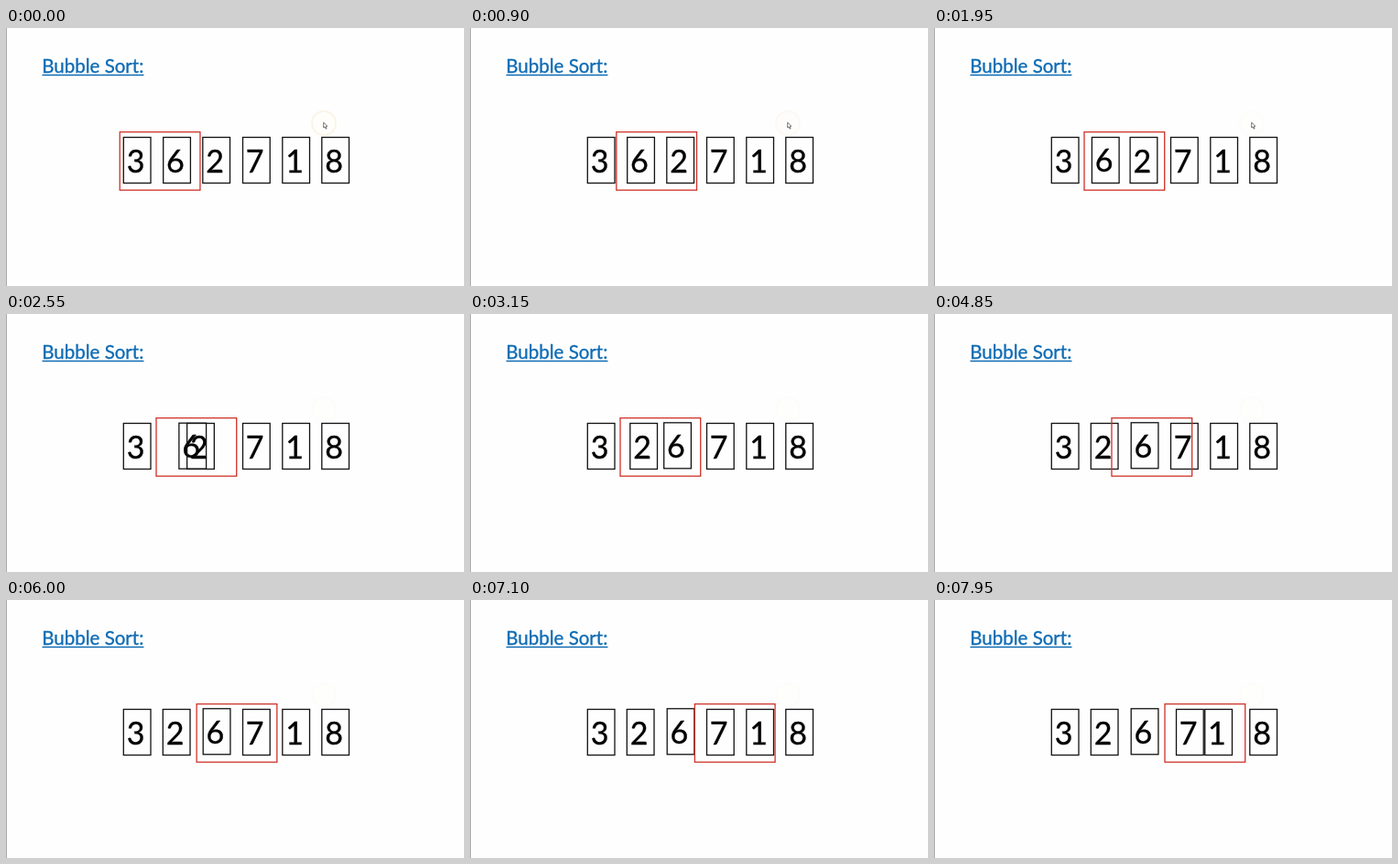
An HTML page with a canvas that plays this animation: 500 px wide and 282 px high, repeating every 8000 ms.

```html
<!DOCTYPE html>
<html lang="en">
<head>
<meta charset="utf-8">
<title>Bubble Sort</title>
<style>
  html, body { margin: 0; width: 100%; height: 100%; overflow: hidden; background: #fff; }
  canvas { display: block; width: 100%; height: 100%; }
</style>
</head>
<body>
<canvas id="stage" width="500" height="282"></canvas>
<script>
const LOOP = 8000;
const MOVE = 1600;
const FONT = 'Lato, Carlito, sans-serif';
const ctx = document.getElementById('stage').getContext('2d');

// Constant acceleration to the midpoint, then constant deceleration
function ease(time, start, duration = MOVE) {
  const p = Math.min(1, Math.max(0, (time - start) / duration));
  return p < 0.5 ? 2 * p * p : 1 - 2 * (1 - p) ** 2;
}

// A thin outline gives the letters a slightly heavier weight
function drawText(text, x, y, size, color) {
  ctx.font = `${size}px ${FONT}`;
  ctx.fillStyle = ctx.strokeStyle = color;
  ctx.lineWidth = 0.35;
  ctx.fillText(text, x, y);
  ctx.strokeText(text, x, y);
}

function drawTitle() {
  const text = 'Bubble Sort:';
  drawText(text, 39.3, 48.6, 20.5, '#0f6cb4');
  ctx.fillRect(39.5, 50.7, ctx.measureText(text).width, 1.5);
}

function drawCard(digit, x, y = 119.5) {
  ctx.strokeStyle = '#111';
  ctx.lineWidth = 1.3;
  ctx.strokeRect(x, y, 29.7, 50);
  ctx.textAlign = 'center';
  drawText(digit, x + 13.2, y + 38, 34, '#000');
  ctx.textAlign = 'left';
}

function drawSelection(x) {
  ctx.strokeStyle = '#cf3229';
  ctx.lineWidth = 1.3;
  ctx.strokeRect(x, 113.7, 87.7, 63.5);
}

function drawPointer(time) {
  const glow = Math.max(0.12, 0.6 - time / 2800);
  ctx.strokeStyle = `rgba(248, 236, 220, ${glow})`;
  ctx.fillStyle = `rgba(255, 253, 248, ${glow})`;
  ctx.lineWidth = 2;
  ctx.beginPath();
  ctx.arc(347, 104, 13, 0, 2 * Math.PI);
  ctx.fill();
  ctx.stroke();
  if (time >= 2300) return;

  ctx.fillStyle = '#fff';
  ctx.strokeStyle = '#666';
  ctx.lineWidth = 0.9;
  ctx.beginPath();
  [[346.7, 103.2], [346.7, 109], [348, 107.9], [349, 110.2],
   [350.1, 109.7], [349.2, 107.5], [350.9, 107.3]].forEach(([x, y]) => ctx.lineTo(x, y));
  ctx.closePath();
  ctx.fill();
  ctx.stroke();
}

function draw(time) {
  ctx.fillStyle = '#fefefe';
  ctx.fillRect(0, 0, 500, 282);
  ctx.fillStyle = '#aaa';
  ctx.fillRect(0, 0, 1, 282);

  drawTitle();
  drawPointer(time);

  const firstSwap = 43.5 * ease(time, 1800, 1690);
  const secondSwap = 43.5 * ease(time, 7530);
  drawCard('3', 128.3);
  drawCard('6', 171.7 + firstSwap, 119.5 - firstSwap / 60);
  drawCard('2', 214.8 - firstSwap);
  drawCard('7', 258.5 + secondSwap);
  drawCard('1', 301.8 - secondSwap);
  drawCard('8', 344.8);

  const steps = ease(time, -350) + ease(time, 3890) + ease(time, 5940);
  drawSelection(120 + 44 * steps);
}

function frame(now) {
  draw(now % LOOP);
  requestAnimationFrame(frame);
}
draw(0);
requestAnimationFrame(frame);
</script>
</body>
</html>
```
